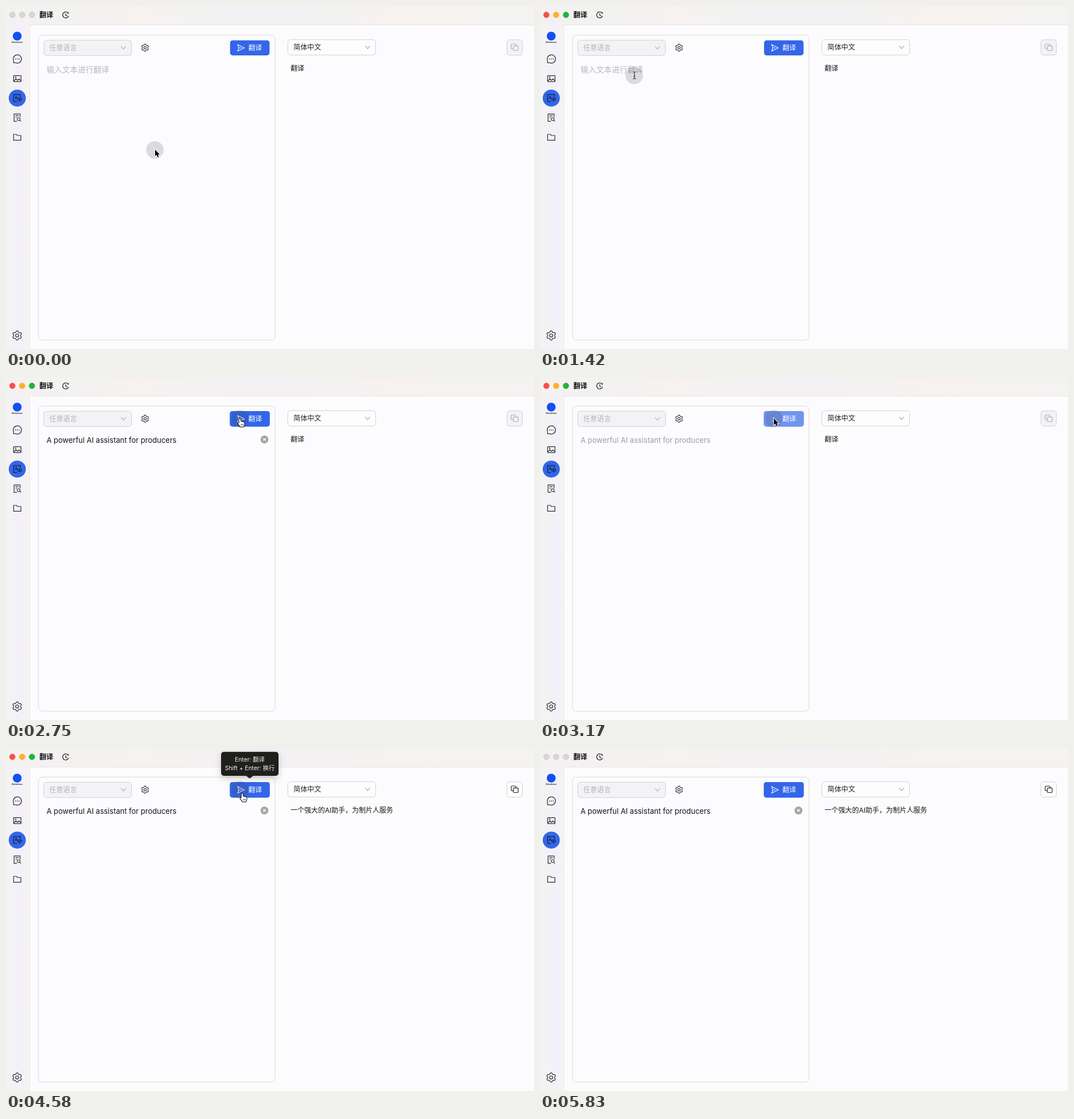
An HTML page with a canvas for the animation above (8.01 s loop, 928 px wide and 604 px high).

```html
<!DOCTYPE html>
<html lang="zh-CN">
<head>
<meta charset="utf-8">
<title>翻译</title>
<style>
html, body { margin: 0; width: 100%; height: 100%; overflow: hidden; background: #fcfcfe; }
canvas { display: block; }
</style>
</head>
<body>
<canvas id="stage" width="928" height="604"></canvas>
<script>
const ctx = document.getElementById('stage').getContext('2d');
const FONT = 'Inter, "Noto Sans CJK SC", "Noto Sans CJK", sans-serif';
const LOOP = 8010, TICK = 1000 / 12;
const INK = '#2c2c2e', BLUE = '#3366e8';
const INPUT = 'A powerful AI assistant for producers';
const RESULT = '一个强大的AI助手，为制片人服务';

// Events, in ticks
const FOCUS = 5, CARET_ON = 11, CARET_OFF = 17, PASTE = 20, BLINK = 26;
const SEND = 34, STREAM = 40, DONE = 43, LEAVE = 65, BLUR = 70;

// Pointer path: tick, x, y
const PATH = [
  [4, 262, 253], [12, 166, 122], [19, 166, 122], [23, 321, 77], [26, 321, 77],
  [27, 350, 77], [30, 411, 73], [54, 411, 73], [55, 415, 80], [63, 872, 608]
];

const ramp = (n, a, b) => Math.min(1, Math.max(0, (n - a) / (b - a)));

function pointer(n) {
  let [, x, y] = PATH[0];
  for (let i = 1; i < PATH.length && n > PATH[i - 1][0]; i++) {
    const [a, x0, y0] = PATH[i - 1], [b, x1, y1] = PATH[i];
    const p = (1 - Math.cos(Math.PI * ramp(n, a, b))) / 2;
    x = x0 + (x1 - x0) * p;
    y = y0 + (y1 - y0) * p;
  }
  return [x, y];
}

function text(str, x, y, size, color, weight = 400, align = 'left') {
  ctx.font = `${weight} ${size}px ${FONT}`;
  ctx.textAlign = align;
  ctx.fillStyle = color;
  ctx.fillText(str, x, y);
}

function paint(fill, stroke, width = 1) {
  if (fill) { ctx.fillStyle = fill; ctx.fill(); }
  if (stroke) { ctx.strokeStyle = stroke; ctx.lineWidth = width; ctx.stroke(); }
}

function box(x, y, w, h, r, fill, stroke, width) {
  ctx.beginPath();
  ctx.roundRect(x, y, w, h, r);
  paint(fill, stroke, width);
}

function disc(x, y, r, fill, stroke, width) {
  ctx.beginPath();
  ctx.arc(x, y, r, 0, Math.PI * 2);
  paint(fill, stroke, width);
}

function shape(d, x, y, fill, stroke, width) {
  const p = new Path2D(d);
  ctx.save();
  ctx.translate(x, y);
  if (stroke) { ctx.strokeStyle = stroke; ctx.lineWidth = width || 1; ctx.stroke(p); }
  if (fill) { ctx.fillStyle = fill; ctx.fill(p); }
  ctx.restore();
}

const line = (d, x, y, color = INK, width = 1.2) => shape(d, x, y, null, color, width);

function gear(x, y, r, width) {
  ctx.beginPath();
  for (let i = 0; i < 72; i++) {
    const a = i * Math.PI / 36;
    const d = r * (0.9 - 0.13 * Math.tanh(2 * Math.cos(6 * a)));
    ctx.lineTo(x + d * Math.cos(a), y + d * Math.sin(a));
  }
  ctx.closePath();
  paint(null, INK, width);
  disc(x, y, r * 0.34, null, INK, width);
}

function gradient(x0, y0, x1, y1, colors) {
  const g = ctx.createLinearGradient(x0, y0, x1, y1);
  colors.forEach((c, i) => g.addColorStop(i / (colors.length - 1), c));
  return g;
}

function drawFrame(active) {
  ctx.fillStyle = gradient(0, 0, 928, 0, ['#f3f1f2', '#f5f2f0', '#f4f1f5', '#f5f2ef', '#f5f3f2']);
  ctx.fillRect(0, 0, 928, 604);
  ctx.fillStyle = gradient(0, 0, 42, 0, ['#f3f3f4', '#f3f2f4', '#f3f0fb', '#f7f4f1']);
  ctx.fillRect(0, 34, 42, 570);
  ctx.beginPath();
  ctx.roundRect(41.5, 33.5, 900, 600, [4, 0, 0, 0]);
  paint('#fcfcfe', '#ebe3da');

  const lights = active ? ['#fb4f49', '#fcb12b', '#25b439'] : ['#d9d7d6', '#d9d7d6', '#d9d7d6'];
  lights.forEach((c, i) => disc(11.2 + i * 17.2, 15.6, 5, c, active ? c : '#c8c5c4', 0.7));
  text('翻译', 58.8, 20, 12.1, '#111', 700);
  line('M3.6 -4.1A5.4 5.4 0 1 0 5.1 1.8M0 -3V.4L2.6 2', 105, 15.7, '#222', 1.2);
  line('M2.2 -4.2L5.2 -4.6L4.6 -1.7Z', 105, 15.7, '#222', 0.8);
}

function drawSidebar() {
  disc(19.7, 53, 7.8, '#1450f0');
  text('Nolvaforme', 19.7, 65, 3.3, '#222', 700, 'center');

  line('M-6.7 6.7L-6.6 3.3A7.3 7.3 0 1 1 -3.3 6.6Z', 20, 93.2);
  for (const dx of [-3.2, 0, 3.2]) disc(20 + dx, 93.3, 0.85, INK);

  box(13.4, 122.6, 13, 10.6, 0.8, null, INK, 1.2);
  line('M-6 4L-2.6 .2L.3 3L2.8 .4L6 3.6', 20, 128);
  disc(17, 125.5, 1, null, INK, 0.9);

  disc(19.8, 162.2, 15, BLUE);
  const dark = '#14213f';
  line('M5.6 -2V-6.3H-6.4V5.9H-.5', 19.8, 162.2, dark);
  line('M-4.2 1.6L-2 -4L.2 1.6M-3.4 -.2H-.6', 19.8, 162.2, dark, 1);
  line('M1.2 0H7.2V3.6H1.2ZM4.2 -1.6V6.4', 19.8, 162.2, dark, 1.1);

  line('M5 -1V-6.6H-5.6V6.4H-.6M-3.2 -3.6H2.6M-3.2 -.8H-.4', 19.8, 196.8);
  disc(22.3, 199.3, 2.5, null, INK, 1.1);
  line('M4.4 4.4L6.4 6.5', 19.8, 196.8);

  line('M-6.4 -5.2H-1.6L.2 -3.2H6.4V5.2H-6.4Z', 19.8, 231.2);
  gear(19.6, 580.2, 7.9, 1.2);
}

function chevron(x, y) {
  line('M-4.2 -2.5L0 2.5L4.2 -2.5', x, y, '#a6a6aa', 1.1);
}

function drawButton(n, fade) {
  const loading = n >= SEND && n < DONE;
  const grow = n >= PASTE ? 0.5 : 0;
  box(393.8 - grow, 60.5 - grow, 69.4 + grow * 2, 26.4 + grow * 2, 4.5, BLUE);
  if (fade) box(393.3, 60, 70.4, 27.4, 4.5, `rgba(255,255,255,${0.3 * fade})`);
  if (loading) {
    const a = n * 0.52;
    ctx.beginPath();
    ctx.arc(412.5, 73.8, 5, a, a + 1.6);
    paint(null, '#fff', 1.2);
  } else {
    line('M-5.6 -5.7L6 0L-5.6 5.7L-3.6 0ZM-3.6 0H.8', 412.8, 73.8, '#fff', 1.1);
  }
  text('翻译', 426, 78.2, 12.1, '#fff');
}

function drawInput(n) {
  const fade = ramp(n, SEND - 1, SEND + 2) - ramp(n, 45, 49);
  box(57, 51.2, 416, 537.2, 7, null, '#dad9d6');
  box(66.3, 60.2, 154.4, 27, 5, '#f3f3f5', '#d1d1d6');
  text('任意语言', 76, 78.2, 12.2, '#b4b4b7');
  chevron(206.5, 73.5);
  gear(244.4, 73.4, 6.2, 1.1);
  drawButton(n, fade);

  if (n < PASTE) {
    text('输入文本进行翻译', 71.2, 116.7, 13.75, '#b9b9bc');
  } else {
    text(INPUT, 71.2, 116.4, 13, `rgba(20,20,22,${1 - 0.6 * fade})`);
    if (n < SEND || n >= DONE) {
      disc(454.3, 110, 6.9, '#a5a5a5');
      line('M-2.3 -2.3L2.3 2.3M2.3 -2.3L-2.3 2.3', 454.3, 110, '#fff', 1.3);
    }
  }
  ctx.fillStyle = '#222';
  if (n >= CARET_ON && n < CARET_OFF) ctx.fillRect(70.5, 103, 1, 17);
  if (n >= PASTE && n < BLINK) ctx.fillRect(302.5, 103, 1, 17);
}

function drawOutput(n) {
  const ready = n >= DONE;
  box(495.3, 59.3, 154.4, 27, 5, '#fdfdfe', '#d1d1d6');
  text('简体中文', 505.2, 77.4, 12.2, '#222');
  chevron(635.5, 72.7);

  box(880.5, 59.5, 27, 27, 4.5, ready ? '#fdfdfe' : '#f3f3f5', '#d1d1d6');
  const c = ready ? '#222' : '#aeaeb2';
  box(891.8, 70.3, 8.4, 8.2, 1.4, null, c, 1.2);
  line('M-2.6 2.2H-4.6A1.3 1.3 0 0 1 -5.9 .9V-4.7A1.3 1.3 0 0 1 -4.6 -6H1.1A1.3 1.3 0 0 1 2.4 -4.7V-2.8', 893.8, 73, c);

  const shown = n < STREAM ? '翻译' : RESULT.slice(0, (n - STREAM + 1) * 4);
  text(shown, 500.2, 113.7, 12.05, '#161616');
}

function drawTooltip(n) {
  const alpha = ramp(n, 41, 43) - ramp(n, 56, 59);
  if (alpha <= 0) return;
  ctx.save();
  ctx.globalAlpha = alpha;
  ctx.shadowColor = 'rgba(0,0,0,.18)';
  ctx.shadowBlur = 12;
  ctx.shadowOffsetY = 4;
  box(378, 6.8, 101, 42.2, 5, '#1f1f1b');
  ctx.shadowColor = 'transparent';
  shape('M-6.5 0L0 5L6.5 0Z', 428.3, 48.8, '#1f1f1b');
  text('Enter: 翻译', 428.4, 23.6, 10.4, '#f4f4f4', 400, 'center');
  text('Shift + Enter: 换行', 428.4, 39.4, 10.4, '#f4f4f4', 400, 'center');
  ctx.restore();
}

const ARROW = 'M0 0V11.6L2.7 9.1L4.6 13.4L6.6 12.5L4.8 8.4H8.4Z';
const HAND = 'M-1.1 .8C-1.1 -.8 1.2 -.8 1.3 .8V4.6C2.2 3.9 3.4 4.2 3.7 5C4.6 4.5 5.6 4.8 5.9 5.7' +
  'C6.9 5.3 7.8 6 7.8 7.2V9.4C7.8 11.4 6.6 11.8 6.5 13.6H.8C.5 11.8 -1.6 10.6 -3 8.3C-3.6 7 -2.2 6.3 -1.1 7.6Z';
const BEAM = 'M-2.6 -6.3C-1 -6.3 0 -5.8 0 -4.8C0 -5.8 1 -6.3 2.6 -6.3M0 -4.8V4.8' +
  'M-2.6 6.3C-1 6.3 0 5.8 0 4.8C0 5.8 1 6.3 2.6 6.3M-1.5 2H1.5';

function drawPointer(n) {
  if (n >= LEAVE) return;
  const [hx, hy] = pointer(n - 1), [x, y] = pointer(n);
  disc(hx - 0.3, hy + 0.4, 15.4, 'rgba(60,60,60,.17)');

  const onButton = x > 393 && x < 464 && y > 60 && y < 88;
  const onText = x > 57 && x < 473 && y > 95;
  const loading = n >= SEND && n < DONE;
  if (n >= FOCUS && onText) {
    line(BEAM, x, y, 'rgba(255,255,255,.8)', 2.4);
    line(BEAM, x, y, '#111', 1.1);
  } else if (onButton && !loading) {
    shape(HAND, x, y + 1, '#fff', '#111', 2);
    line('M2.2 8.6V11.4M4 8.6V11.4M5.7 8.6V11.4', x, y + 1, '#111', 0.7);
  } else {
    shape(ARROW, x, y, '#000', '#fff', 1.8);
  }
}

function draw(now) {
  const n = Math.floor((now % LOOP + 4) / TICK);
  drawFrame(n >= FOCUS && n < BLUR);
  drawSidebar();
  drawInput(n);
  drawOutput(n);
  drawTooltip(n);
  drawPointer(n);
}

const start = performance.now();
function loop() {
  draw(performance.now() - start);
  requestAnimationFrame(loop);
}
loop();
</script>
</body>
</html>
```
